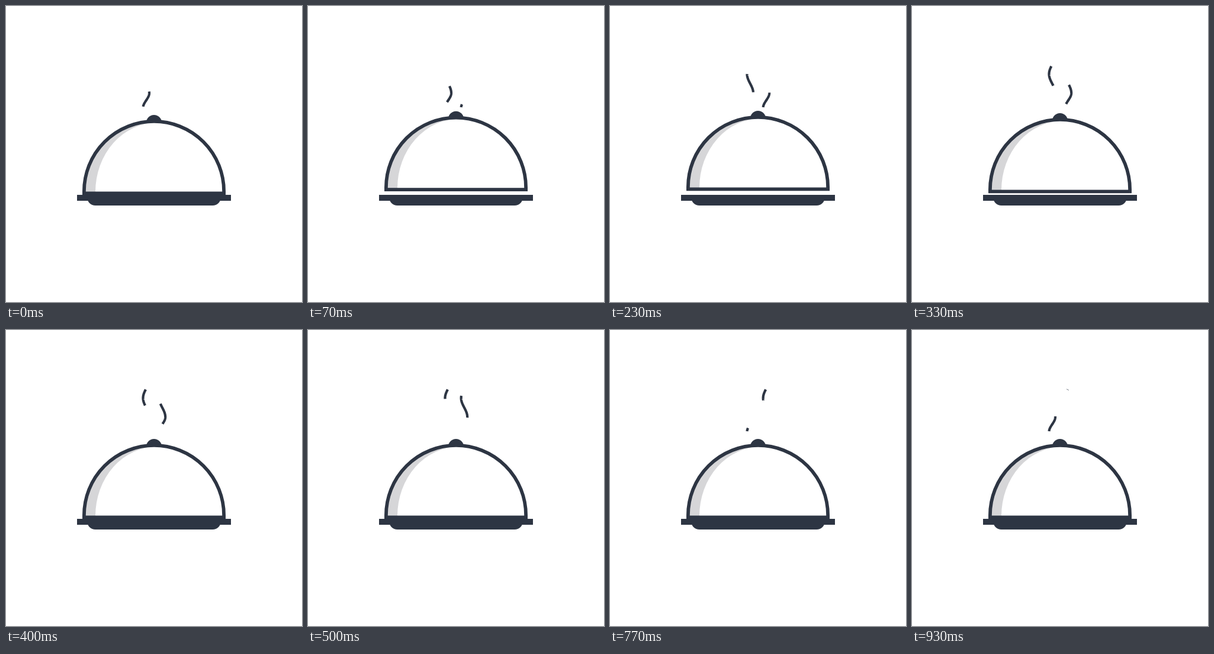
An HTML page with a canvas for the animation above (960 ms loop, 500x500 px).

```html
<!DOCTYPE html>
<html lang="en">
<head>
<meta charset="utf-8">
<title>Serving dome</title>
<style>
  html, body { margin: 0; width: 100%; height: 100%; overflow: hidden; background: #fff; }
  canvas { display: block; width: 500px; height: 500px; }
</style>
</head>
<body>
<canvas id="stage" width="500" height="500"></canvas>
<script>
const ctx = document.getElementById('stage').getContext('2d');
const INK = '#2d3543', SHADE = '#d6d6d8', WHITE = '#fff';
const LOOP = 960, STEP = 100 / 3;
const STEAM_CYCLE = 940, HEAD_TIME = 550, TAIL_TIME = 655;
const STEAM_BOTTOM = 171, STEAM_TOP = 100.5;

// Each wisp is a stroke whose head sets off first and whose tail follows.
const wisps = [
  { x: 236.75, start: -210, tailDelay: 200 },
  { x: 263.9, start: 33, tailDelay: 247 }
];

// The wave is tighter below its right-hand crest.
const sway = y => 5.25 * Math.cos(Math.PI * (y - 147) / (y > 147 ? 25 : 32));

const steam = new Path2D();
let steamLength = 0;
for (let y = STEAM_BOTTOM; y >= STEAM_TOP; y -= 0.5) {
  steam.lineTo(sway(y), y);
  if (y < STEAM_BOTTOM) steamLength += Math.hypot(sway(y) - sway(y + 0.5), 0.5);
}

const progress = (age, duration) => Math.min(1, Math.max(0, age / duration));

function drawWisp({ x, start, tailDelay }, t) {
  const age = (t - start + STEAM_CYCLE) % STEAM_CYCLE;
  const head = steamLength * progress(age, HEAD_TIME);
  const tail = steamLength * progress(age - tailDelay, TAIL_TIME);
  if (head <= tail) return;
  ctx.save();
  ctx.translate(x, 0);
  ctx.lineWidth = 4.2;
  ctx.lineJoin = 'round';
  ctx.setLineDash([head - tail, 2 * steamLength]);
  ctx.lineDashOffset = -tail;
  ctx.stroke(steam);
  ctx.restore();
}

function domePath() {
  ctx.beginPath();
  ctx.moveTo(131.9, 316.4);
  ctx.arc(250, 313, 118.1, Math.PI, 0);
  ctx.lineTo(368.1, 316.4);
  ctx.closePath();
}

function drawDome(lift) {
  ctx.save();
  ctx.translate(0, -lift);

  ctx.save();
  domePath();
  ctx.clip();
  ctx.fillStyle = SHADE;
  ctx.fillRect(130, 190, 120, 130);
  ctx.fillStyle = WHITE;
  ctx.beginPath();
  ctx.ellipse(255, 314, 104, 117, 0, Math.PI, 1.5 * Math.PI);
  ctx.lineTo(375, 190);
  ctx.lineTo(375, 320);
  ctx.lineTo(151, 320);
  ctx.fill();
  ctx.restore();

  domePath();
  ctx.lineWidth = 5.8;
  ctx.lineJoin = 'miter';
  ctx.stroke();

  ctx.fillStyle = INK;
  ctx.beginPath();
  ctx.arc(250, 197, 13, Math.PI, 0);
  ctx.fill();
  ctx.restore();
}

function drawTray() {
  ctx.fillStyle = INK;
  ctx.fillRect(120, 319, 260, 10);
  ctx.beginPath();
  ctx.roundRect(137, 319, 226, 18, [0, 0, 14, 14]);
  ctx.fill();
}

// A quick hop that falls back more slowly.
const liftAt = t => 8.3 * Math.sin(Math.PI * progress(t, 390) ** 0.75);

function draw(t) {
  ctx.fillStyle = WHITE;
  ctx.fillRect(0, 0, 500, 500);
  ctx.strokeStyle = INK;
  drawDome(liftAt(t));
  drawTray();
  wisps.forEach(wisp => drawWisp(wisp, t));
}

// Thirty poses per second, on a 10 ms clock.
function snap(t) {
  const pose = Math.floor((Math.floor(t / 10) * 10 + 3.4) / STEP);
  return Math.round(pose * STEP / 10) * 10;
}

let start;
function tick(now) {
  start ??= now;
  draw(snap((now - start) % LOOP));
  requestAnimationFrame(tick);
}
draw(0);
requestAnimationFrame(tick);
</script>
</body>
</html>
```
